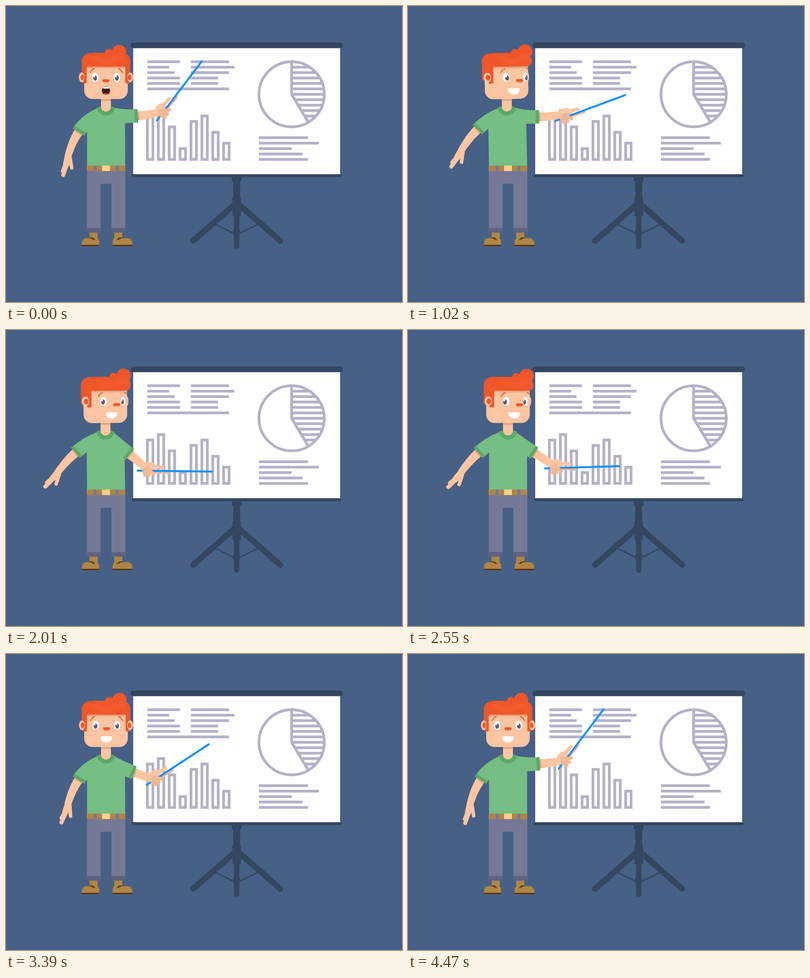
Animation, 800 px wide and 600 px high, one loop 4.5 s. Source, as an HTML page with a canvas:

```html
<!DOCTYPE html>
<html lang="en">
<head>
<meta charset="utf-8">
<title>Presenter</title>
<style>
  html, body { margin: 0; width: 100%; height: 100%; overflow: hidden; background: #476086; }
  canvas { display: block; }
</style>
</head>
<body>
<canvas id="stage" width="800" height="600"></canvas>
<script>
const g = document.getElementById('stage').getContext('2d');
const LOOP = 4500, RAD = Math.PI / 180, { sin, cos, min, max, abs, hypot, atan2, exp } = Math;
const BG = '#476086', DARK = '#34475f', GREY = '#b3b1c6', SKIN = '#fdc5a1', SHADE = '#e3a784',
  KNUCKLE = '#f0b896', SHIRT = '#76be83', TRIM = '#5ca868', HAIR = '#f05628', BROWN = '#b08545',
  SOLE = '#5c3a10', PANTS = '#767996', HEM = '#5f6280', STICK = '#1390ff';

// Key poses, time first.
const TURN = [[0, 0], [570, 15], [1440, 32], [2010, 23], [2730, 23], [3030, -8], [3840, 14]];
const SWING = [ // left arm angle, hand angle
  [0, 123, 103], [570, 138, 120], [1440, 133, 120], [2350, 142, 134], [3030, 123.5, 113], [3840, 123, 105]];
const POINTER = [ // lower end x, y, angle
  [0, 305, 232, -53], [570, 297, 244, -53.4], [1050, 298, 232, -20], [1440, 293, 221, -34],
  [2010, 266, 285, 0.8], [3030, 286, 273, -7.6], [3840, 282, 253, -65]];

// Smooth cyclic interpolation without overshoot.
function sample(track, t) {
  const n = track.length;
  let i = n - 1;
  while (track[i][0] > t) i--;
  const [a, b, c, d] = [-1, 0, 1, 2].map(o => {
    const j = i + o, row = track[(j + n) % n];
    return [row[0] + LOOP * Math.floor(j / n), ...row.slice(1)];
  });
  const h = c[0] - b[0], u = (t - b[0]) / h;
  const mean = (p, q) => p * q > 0 ? 2 * p * q / (p + q) : 0;
  return b.slice(1).map((v, j) => {
    const k = j + 1, slope = (p, q) => (q[k] - p[k]) / (q[0] - p[0]);
    const s = slope(b, c), m0 = mean(slope(a, b), s) * h, m1 = mean(s, slope(c, d)) * h;
    const e = c[k] - v;
    return v + u * (m0 + u * (3 * e - 2 * m0 - m1 + u * (m0 + m1 - 2 * e)));
  });
}

const polar = (x, y, r, angle) => [x + r * cos(angle * RAD), y + r * sin(angle * RAD)];

function fill(color, path) { g.fillStyle = color; g.fill(new Path2D(path)); }
function stroke(color, width, path, cap = 'round') {
  g.strokeStyle = color; g.lineWidth = width; g.lineCap = cap;
  g.stroke(new Path2D(path));
}
function rect(color, x, y, w, h, r = 0) {
  g.fillStyle = color; g.beginPath(); g.roundRect(x, y, w, h, r); g.fill();
}
function oval(color, x, y, rx, ry = rx) {
  g.fillStyle = color; g.beginPath(); g.ellipse(x, y, rx, ry, 0, 0, 7); g.fill();
}
function within(x, y, angle, draw) {
  g.save(); g.translate(x, y); g.rotate(angle * RAD); draw(); g.restore();
}

function drawScreen() {
  rect(BG, 0, 0, 800, 600);
  stroke(DARK, 12, 'M462 402L378 476M470 402L554 476');
  stroke(DARK, 3, 'M420 441L466 464L512 441');
  rect(DARK, 456, 346, 20, 9);
  rect(DARK, 459, 346, 14, 50);
  rect(DARK, 457.5, 388, 17, 38);
  rect(DARK, 460.5, 400, 11, 92, 5);
  rect(DARK, 459, 454, 14, 11);
  rect('#fff', 257, 84, 418, 258);
  rect(DARK, 251.5, 74, 429, 11.5, 5.5);
  rect(DARK, 254, 341, 424, 6, 3);

  // Everything on the screen sits on an 11 px grid.
  const textLines = (x, y, lengths) => lengths.forEach((n, i) =>
    stroke(GREY, 5.5, `M${x} ${y + 11 * i}h${11 * n}`, 'butt'));
  textLines(285.5, 113, [6, 4, 5, 6, 6, 15]);
  textLines(373.5, 113, [7, 8, 7, 5, 5]);
  textLines(511, 267, [9, 11, 6, 8, 9]);
  [8, 9, 6, 2, 7, 8, 5, 3].forEach((n, i) =>
    stroke(GREY, 5.5, `M${285.7 + 22 * i} 311h11v${-11 * n}h-11z`));

  stroke(GREY, 5.5, 'M577 113V179L611 236');
  g.save();
  g.clip(new Path2D('M577 113V179L611 236A66 66 0 0 0 577 113'));
  for (let y = 124; y < 230; y += 11) stroke(GREY, 5.5, `M577 ${y}H650`);
  g.restore();
  g.beginPath(); g.arc(577, 179, 66, 0, 7); g.stroke();
}

function drawShoe(ankle, x, width, corners, side) {
  rect(BROWN, ankle, 459, 16.5, 16);
  rect(BROWN, x, 470.5, width, 15, corners);
  rect(SOLE, x, 484, width, 3, 1);
  g.save();
  g.translate(ankle + 8.3, 470); g.scale(side, 1);
  stroke(SOLE, 1.6, 'M-9 0Q0 -1 2 4M-5 1Q-1 1 -1 4');
  g.restore();
}
function drawLegs() {
  drawShoe(168.8, 153.5, 34.7, [9, 7, 1, 1], 1);
  drawShoe(218.5, 215.5, 39.7, [7, 10, 1, 1], -1);
  fill(PANTS, 'M163.5 333H241V451H213V360.5H191V451H163.5z');
  rect(HEM, 162, 450, 29, 9.5);
  rect(HEM, 212.5, 450, 29.5, 9.5);
  rect(BROWN, 163, 323, 78, 11.5);
  rect(PANTS, 177, 323, 6, 11.5);
  rect(PANTS, 221, 323, 6, 11.5);
  rect('#fdcf8b', 194, 323, 16, 11.5);
}

// Tapered arm that leaves the cuff along its angle.
function drawArm({ x, y, angle }, [wx, wy], w0, w1) {
  const [cx, cy] = polar(x, y, hypot(wx - x, wy - y) * 0.48, angle);
  for (let u = 0; u <= 1; u += 0.025) {
    const v = 1 - u;
    oval(SKIN, v * v * x + 2 * u * v * cx + u * u * wx,
      v * v * y + 2 * u * v * cy + u * u * wy, (w0 * v + w1 * u) / 2);
  }
  within(x, y, angle, () => rect(SHADE, 0, -w0 / 2, 3, w0));
}

function drawLeftHand([x, y], angle) {
  within(x, y, angle, () => {
    stroke(SKIN, 13, 'M0 0L14 0');
    stroke(SKIN, 8, 'M10 -2L37 1');
    stroke(SKIN, 7, 'M10 1L29 4M0 -5L19 -12.5');
  });
}

function drawPointer(x, y, angle) {
  within(x, y, angle, () => {
    stroke(KNUCKLE, 6, 'M28 1L60 3');
    oval(SKIN, 22.5, -6, 14, 12);
    stroke(STICK, 4, 'M0 0H150');
    stroke(SKIN, 7, 'M28 -9L50 -7');
    stroke(KNUCKLE, 7, 'M20 -6L32 7M16 -3L23 9M13 0L15 9');
  });
}

function drawShirt(lean, left, right) {
  const ends = ({ x, y, angle }, half) => {
    const c = cos(angle * RAD), s = sin(angle * RAD);
    return { c, s, top: [x + half * s, y - half * c], low: [x - half * s, y + half * c] };
  };
  const l = ends(left, -13.7), r = ends(right, 13.5);
  const pit = (e, x) => `${x} ${e.low[1] + (x - e.low[0]) * e.s / e.c}`;
  const bend = (e, d) => `${e.top[0] - d * e.c} ${e.top[1] - d * e.s}`;
  fill(SHIRT, `M${192 + lean} 204L${186 + lean} 206.5Q${bend(l, 33)} ${l.top}L${l.low}
    L${pit(l, 163.7 + lean * 0.6)}L163.7 323.5H240.7L${pit(r, 240.5 + lean * 0.7)}
    L${r.low}L${r.top}Q${bend(r, 30)} ${216 + lean} 205.5L${212 + lean} 204z`);
  for (const [{ x, y, angle }, half] of [[left, 13.7], [right, 13.5]])
    within(x, y, angle, () => rect(TRIM, -6.5, -half, 6.5, half * 2));
  fill(TRIM, `M${183.5 + lean} 206A18.7 18.7 0 0 0 ${220.5 + lean} 206L${212 + lean} 203H${192 + lean}z`);
}

function drawMouth(x, t) {
  within(x, 173, 0, () => {
    if (t < 300) {
      oval(SHADE, 0, -1, 9.5, 10);
      oval('#47151a', 0, -1, 8, 8.5);
      rect('#fff', -6, -9, 12, 3.5, 2);
      fill('#e2452f', 'M-6 5Q0 2 6 5Q3 8 0 8Q-3 8 -6 5');
      stroke('#fff', 1.2, 'M-4 7Q0 9 4 7');
    } else if (t < 750) {
      fill('#c98560', 'M-12.5 -5Q0 -3 12.5 -5Q12 5 6 6L0 4L-6 6Q-12 4 -12.5 -5z');
      fill('#fff', 'M-11 -3Q0 -1 11 -3Q10 3 6 4L0 3L-6 4.5Q-10 3 -11 -3z');
    } else {
      fill('#fff', 'M-10.5 -6H10.5Q12 -6 11.5 -3C10 10 -10 10 -11.5 -3Q-12 -6 -10.5 -6z');
    }
  });
}

// One side of the head; away is how far that side has turned to the back.
function drawEar(side, x, rx) {
  oval(SKIN, side * x, 144.5, rx, 10);
  oval(HAIR, side * (x - 1.2), 144.5, rx * 0.62, 5.7);
}
function drawSideburn(side, inner, outer) {
  const width = outer - inner, strip = min(9.5, width);
  if (width <= 0) return;
  g.save(); g.scale(side, 1);
  rect(HAIR, inner, 112, width, 38, [0, 0, 3, 2]);
  rect(HAIR, inner, 120, strip, 37, [0, 0, 3, 3]);
  g.restore();
}

function drawHead(lean, turn, t) {
  rect(SKIN, 192 + lean, 180, 20, 34, [0, 0, 10, 10]);
  rect(SHADE, 192 + lean, 180, 20, 12.5);
  g.save();
  g.translate(202 + lean, 190); g.rotate(lean / 2 * RAD); g.translate(0, -190);

  const ahead = max(0, turn), back = max(0, -turn);
  const outL = -49 + back * 0.5, outR = 49 + ahead * 0.1, corner = 22 - back;
  const inL = -39 + ahead * 0.48 - back * 0.8, inR = 39 + turn * 0.7;
  const earL = () => drawEar(-1, 49 - ahead * 0.4 - back * 0.25, min(7.5, 5.7 + turn * 0.12));
  const earR = () => drawEar(1, 49 - ahead * 0.25 - back * 0.4, max(1, 5.9 - turn * 0.1));
  if (turn < -3) earL();
  if (turn > 3) earR();

  const face = new Path2D();
  face.roundRect(-44, 105, 88, 83.5, [0, 0, 17, 17]);
  g.fillStyle = SKIN; g.fill(face);
  g.save();
  g.clip(face);
  rect(SHADE, inL, 118, 88, 8.5);
  const look = 2.4 * sin(2 * Math.PI * t / 3600) * min(1, abs(turn) / 8);
  for (const [x, rx] of [[-22 + turn * 0.8, 6.5], [22 + turn * 0.6, 6.3 - ahead * 0.09]]) {
    oval('#fff', x, 144.5, rx, 9);
    oval('#5a5e7e', x + look, 146, min(3.9, rx * 0.62), 5.2);
    oval('#fff', x + look - 1.5, 142.7, 1.5, 1.7);
  }
  stroke(HAIR, 2, `M${-32 + turn * 0.8} 135q2 -6 8 -8M${25 + turn * 0.6} 127q6 2 8 8`);
  g.restore();

  rect(SHADE, -6 + turn, 152, 12, 4.5, 2);
  rect(HAIR, -7 + turn, 148.5, 14, 5.5, 2.7);
  drawMouth(turn * 0.55, t);

  const bun = 26.5 + turn * 0.47;
  oval(HAIR, bun, 93.2, 14.5);
  oval(HAIR, bun - 20.5, 95, 8);
  fill(HAIR, `M${outL} 113Q${outL} 95 ${outL + corner} 95H32Q${outR} 97 ${outR} 112
    Q${outR} 123 ${outR - 10} 123H${outL + 9}Q${outL} 123 ${outL} 113z`);
  drawSideburn(-1, -inL, -outL);
  drawSideburn(1, inR, outR);
  for (let i = 0; i < 4; i++)
    stroke('#f47245', 0.6, `M${bun - 58 + i * 4} ${104 + i * 4}
      C${bun - 40} ${98 + i * 4} ${bun - 28} ${116 + i * 2} ${bun - 14} ${105 + i * 3}
      S${bun + 4} ${96 + i * 4} ${bun + 13} ${101 + i * 5}`);
  if (turn >= -3) earL();
  if (turn <= 3) earR();
  g.restore();
}

// The left cuff follows the swing of the whole arm.
function leftCuff(lean, swing) {
  const [x, y] = polar(176 + lean, 228, 40.3, 137 + 0.73 * (swing - 123));
  return { x, y, angle: swing };
}

// The right cuff follows the wrist and drops when the arm is folded.
function rightCuff(lean, [wx, wy]) {
  const dx = wx - 226 - lean, dy = wy - 222, reach = hypot(dx, dy);
  const aim = atan2(dy, dx) / RAD, slack = max(0, 72 - reach);
  const [x, y] = polar(226 + lean, 222, 20 + reach / 4, aim + 5 + 1.8 * slack);
  return { x, y, angle: 0.87 * aim + 0.65 * slack };
}

function render(t) {
  const lean = -6 * exp(-(((t - 1440) / 430) ** 2));
  const [turn] = sample(TURN, t), [swing, hand] = sample(SWING, t), [px, py, pa] = sample(POINTER, t);
  const left = leftCuff(lean, swing), leftWrist = polar(176 + lean, 228, 94, swing);
  const rightWrist = polar(...polar(px, py, 14, pa), 8, pa - 90);
  const right = rightCuff(lean, rightWrist);
  drawScreen();
  drawLegs();
  drawArm(left, leftWrist, 18, 13.5);
  drawLeftHand(leftWrist, hand);
  drawArm(right, rightWrist, 18, 15);
  drawShirt(lean, left, right);
  drawHead(lean, turn, t);
  drawPointer(px, py, pa);
}

const start = performance.now();
function tick() {
  render((performance.now() - start) % LOOP);
  requestAnimationFrame(tick);
}
tick();
</script>
</body>
</html>
```
